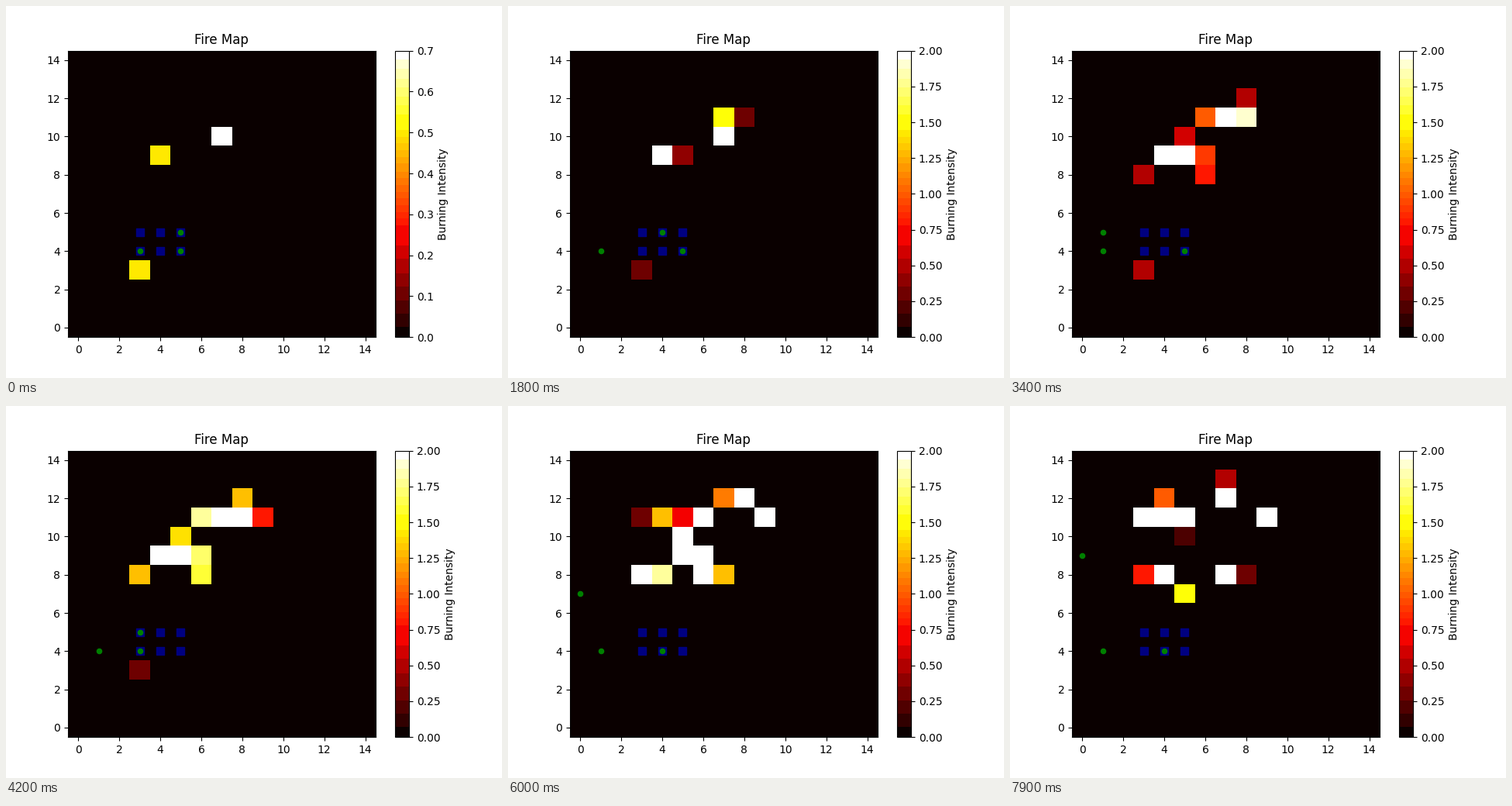
Animation of 640 by 480 pixels, one loop 8000 ms. Source, as a matplotlib script:

```python
import matplotlib.pyplot as plt
import numpy as np
from matplotlib.animation import FuncAnimation
from matplotlib.cm import ScalarMappable
from matplotlib.colors import ListedColormap

SIZE = 15
FRAMES = 80
INTERVAL = 100
GROWTH = 0.1
MAX_HEAT = 2.0

# Where and at which step a fire starts: x, y, step
SPARKS = [
    (7, 10, -7), (4, 9, -5), (7, 11, 3), (5, 9, 14), (8, 11, 15),
    (6, 11, 24), (6, 9, 25), (6, 8, 26), (5, 10, 28), (3, 8, 29),
    (8, 12, 29), (9, 11, 34), (4, 8, 42), (4, 11, 47), (7, 8, 47),
    (7, 12, 49), (5, 11, 53), (3, 11, 57), (5, 7, 64), (4, 12, 69),
    (3, 8, 71), (7, 13, 74), (8, 8, 76), (5, 10, 77),
]

# Stops of each firefighter: arrival step, x, y
ROUTES = [
    [(0, 3, 4), (4, 1, 4)],
    [(0, 5, 5), (9, 4, 5), (31, 1, 5), (40, 3, 5), (50, 0, 5), (62, 0, 9)],
    [(0, 5, 4), (39, 3, 4), (48, 4, 4)],
]


def fuel(x, y):
    """Steps a cell can burn; the south and one diagonal strip are sparse."""
    return 37 if y < 9 or y - x == 3 else 49


def heat_map(step):
    grid = np.zeros((SIZE, SIZE))
    for x, y, start in SPARKS:
        age = step - start
        if 0 < age <= fuel(x, y):
            grid[y, x] = min(GROWTH * age, MAX_HEAT)
    if step < 50:  # the fire beside the base flares until it is put out
        grid[3, 3] = 0.4 + 0.1 * np.cos(2 * np.pi * step / 30)
    return grid.round(1)


def position(route, step):
    """Walk at most one cell per step, reaching each stop on time."""
    spot = np.array(route[0][1:])
    for arrival, *stop in route[1:]:
        left = max(arrival - step, 0)
        spot = stop + np.clip(spot - stop, -left, left)
    return spot


def banded(cmap, widths=(32, 16, 32)):
    """Merge a colormap's shades into flat bands, keeping both end colours."""
    shades = cmap(np.arange(256))[:, :3]
    buckets = (shades * 255) // widths
    band = np.r_[0, np.cumsum(np.any(np.diff(buckets, axis=0), axis=1))]
    flat = np.array([shades[band == b].mean(axis=0) for b in band])
    flat[band == 0], flat[band == band[-1]] = shades[0], shades[-1]
    return ListedColormap(flat)


fig, ax = plt.subplots(figsize=(6.4, 4.8), dpi=100)
hot = plt.get_cmap("hot")
image = ax.imshow(heat_map(0), cmap=hot, origin="lower", aspect="auto",
                  interpolation="nearest")
fig.colorbar(ScalarMappable(image.norm, banded(hot)), ax=ax,
             label="Burning Intensity")
ax.set_title("Fire Map")

base_x, base_y = np.meshgrid([3, 4, 5], [4, 5])
ax.scatter(base_x, base_y, s=50, marker="s", color="navy")
crew = ax.scatter([0] * 3, [0] * 3, s=20, color="green", zorder=3)
ax.set(xlim=(-0.5, SIZE - 0.5), ylim=(-0.5, SIZE - 0.5))


def update(step):
    grid = heat_map(step)
    image.set_data(grid)
    image.set_clim(0, grid.max())
    crew.set_offsets([position(route, step) for route in ROUTES])
    return image, crew


anim = FuncAnimation(fig, update, frames=FRAMES, interval=INTERVAL,
                     repeat=True, repeat_delay=0, blit=False)
plt.show()
```
